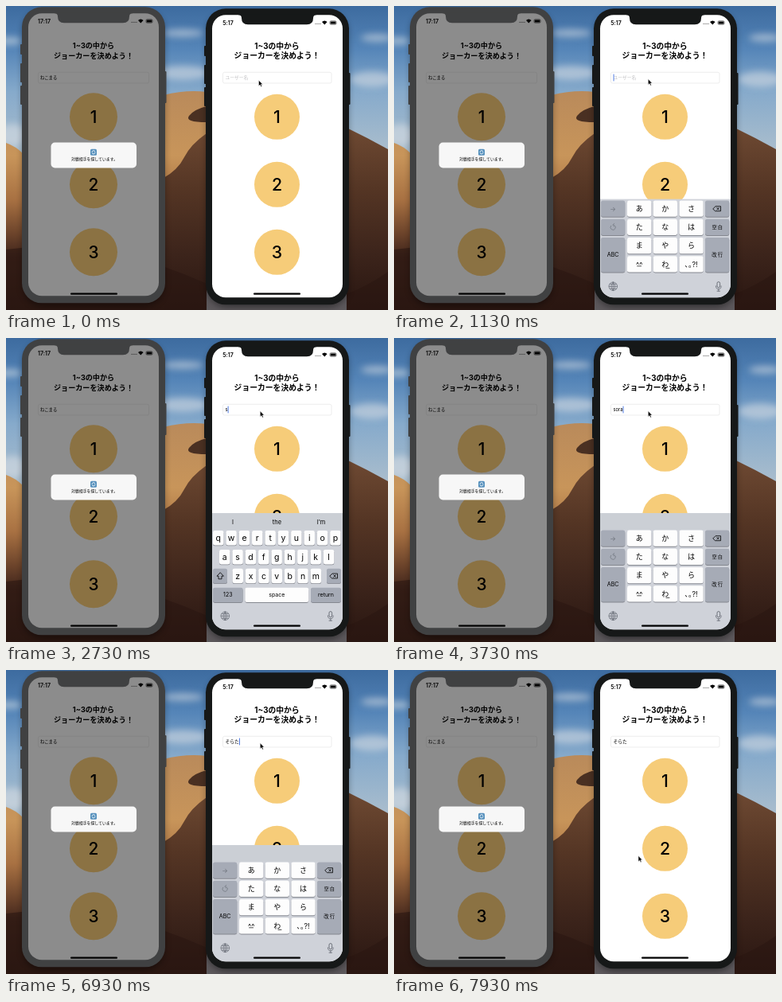
An HTML page that plays this animation: 480x382 px, repeating every 8 s.

```html
<!DOCTYPE html>
<html lang="ja">
<meta charset="utf-8">
<style>
html, body { margin: 0; width: 100%; height: 100%; overflow: hidden; background: #22130f }
svg { display: block; width: 480px; height: 382px }
text { font-family: Inter, "Noto Sans CJK JP", "Noto Sans CJK", sans-serif; white-space: pre }
</style>
<svg id="stage" viewBox="0 0 480 382"></svg>
<script>
const LOOP = 8000;
const stage = document.getElementById('stage');
const $ = id => document.getElementById(id);

const rect = (x, y, w, h, fill, r = 0, more = '') =>
  `<rect x="${x}" y="${y}" width="${w}" height="${h}" rx="${r}" fill="${fill}" ${more}/>`;
const circle = (x, y, r, fill, more = '') => `<circle cx="${x}" cy="${y}" r="${r}" fill="${fill}" ${more}/>`;
const path = (d, fill, more = '') => `<path d="${d}" fill="${fill}" ${more}/>`;
const line = (d, color = '#000', w = .8) =>
  path(d, 'none', `stroke="${color}" stroke-width="${w}" stroke-linecap="round" stroke-linejoin="round"`);
const text = (s, x, y, size, fill = '#000', weight = 400, anchor = 'middle', more = '') =>
  `<text x="${x}" y="${y}" font-size="${size}" fill="${fill}" font-weight="${weight}" text-anchor="${anchor}" ${more}>${s}</text>`;
const group = (body, more = '') => `<g ${more}>${body}</g>`;
const gradient = (id, y1, y2, ...stops) =>
  `<linearGradient id="${id}" gradientUnits="userSpaceOnUse" x1="0" x2="0" y1="${y1}" y2="${y2}">` +
  stops.map(([at, c]) => `<stop offset="${at}" stop-color="${c}"/>`).join('') + '</linearGradient>';

const defs = `<defs>
  ${gradient('sky', 0, 180, [0, '#3d6b9f'], [.3, '#5585b8'], [.6, '#86aacb'], [1, '#a9bdcd'])}
  ${gradient('sand', 105, 382, [0, '#b98a5b'], [.3, '#c8955a'], [.5, '#a87142'], [.66, '#6a422a'], [.76, '#3f251b'], [1, '#2a1711'])}
  ${gradient('shade', 150, 382, [0, '#6f4a33'], [.35, '#543524'], [.7, '#3c241b'], [1, '#291611'])}
  <filter id="soft" x="-50%" y="-50%" width="200%" height="200%"><feGaussianBlur stdDeviation="4"/></filter>
  <clipPath id="screen">${rect(259, 11.3, 164, 355, '#fff', 17)}</clipPath>
</defs>`;

const wallpaper =
  rect(0, 0, 480, 382, 'url(#sky)') +
  group([[4, 44, 16, 5], [8, 162, 18, 14], [222, 34, 26, 5], [222, 84, 34, 9], [466, 40, 20, 5], [460, 92, 28, 10]].map(([x, y, rx, ry]) =>
    `<ellipse cx="${x}" cy="${y}" rx="${rx}" ry="${ry}" fill="#dae1e6" opacity=".55"/>`).join(''), 'filter="url(#soft)"') +
  path('M0 172Q12 176 22 186L198 112Q226 105 252 108V382H0Z', 'url(#sand)') +
  path('M252 126Q236 130 230 138T252 146Z', '#4a3022') +
  path('M252 160Q232 174 224 190T198 216V382H252Z', 'url(#shade)') +
  path('M428 153Q455 166 480 180V382H428Z', 'url(#shade)') +
  path('M0 306Q120 290 250 348T480 334V382H0Z', '#2a1711', 'opacity=".6"');

// Body, side buttons, screen, notch and status bar of one phone.
function phone({ x, y, body, paper, clock }) {
  const ink = '#000', top = y + 8.3;
  const buttons = [[47, 13], [71, 24], [99, 24]].map(([dy, h]) => rect(x - 2, y + dy, 4, h, body, 1)).join('') +
    rect(x + 178, y + 81, 3.5, 40, body, 1);
  const notch = `M${x + 41} ${top - 1}H${x + 139}V${top}Q${x + 135} ${top} ${x + 135} ${top + 4}Q${x + 135} ${top + 12} ${x + 127} ${top + 12}` +
    `H${x + 53}Q${x + 45} ${top + 12} ${x + 45} ${top + 4}Q${x + 45} ${top} ${x + 41} ${top}Z`;
  const sy = y + 18;
  const status = text(clock, x + 28, sy + 2.5, 7, ink, 600) +
    [0, 2, 4, 6].map(d => circle(x + 138 + d, sy + 1.4, .6, ink, 'opacity=".6"')).join('') +
    path(`M${x + 146} ${sy - 1}Q${x + 149.3} ${sy - 4} ${x + 152.6} ${sy - 1}L${x + 149.3} ${sy + 2.6}Z`, ink) +
    rect(x + 156, sy - 2.2, 8, 4.4, 'none', 1.3, `stroke="${ink}" stroke-width=".5"`) +
    rect(x + 156.7, sy - 1.6, 6.6, 3.2, ink, .7);
  return rect(x + 1, y + 5, 178, 371, '#000', 26, 'opacity=".4" filter="url(#soft)"') +
    buttons + rect(x, y + .3, 180, 372, body, 25) +
    rect(x + 8, top, 164, 355, paper, 17) + path(notch, body) + status;
}

// Title, input box and the three numbered discs.
function page({ cx, titleY, size, disc, r, box, edge, num }) {
  return text('1~3の中から', cx, titleY, size, '#000', 700) +
    text('ジョーカーを決めよう！', cx, titleY + 12.4, size, '#000', 700) +
    rect(box[0], 83.3, box[1], 13.7, 'none', 2, `stroke="${edge}" stroke-width=".7"`) +
    [1, 2, 3].map(n => {
      const y = 54.3 + 85 * n;
      return circle(cx, y, r, disc) + text(n, cx, y + 7.6, num, '#000', 450);
    }).join('');
}

const home = x => rect(x, 360.6, 59, 2.1, '#000', 1);

const left = phone({ x: 20, y: 1, body: '#404142', paper: '#8c8c8c', clock: '17:17' }) +
  page({ cx: 110, titleY: 53.2, size: 9.1, disc: '#8b7243', r: 30, box: [40.5, 139], edge: '#828282', num: 20.8 }) +
  text('ねこまる', 43, 92.2, 5.3, '#000', 400, 'start') +
  home(81) + rect(56.5, 171.5, 107.5, 32, '#f7f7f7', 5) +
  rect(106, 179.8, 8, 8, '#5791bd', 1.6) +
  line('M108 183.4A2.1 2.1 0 0 1 111.8 182.6M112 184.2A2.1 2.1 0 0 1 108.2 185', '#fff', .9) +
  text('対戦相手を探しています。', 111, 193.6, 4.9);

// Keyboards
const GREY = '#a6abb6';
const key = (x, y, w, h, label = '', size = 9, fill = '#fdfdfd', ink = '#000') =>
  rect(x, y + .9, w, h, '#858890', 2.4) + rect(x, y, w, h, fill, 2.4) +
  text(label, x + w / 2, y + h / 2 + size * .36, size, ink);
const eraser = (x, y) =>
  line(`M${x - 5} ${y}L${x - 2} ${y - 3}H${x + 4.5}V${y + 3}H${x - 2}ZM${x - .2} ${y - 1.3}l2.6 2.6m0 -2.6l-2.6 2.6`);

const rows = [241.5, 264.7, 288, 311.3], cols = [260, 293, 325.7, 358.4, 391];
const kana = ['あかさ', 'たなは', 'まやら', ['^^', 'わ', '､｡?!']].map((row, j) =>
  [...row].map((c, i) => key(cols[i + 1], rows[j], 30.3, 20.3, c, 9)).join('')).join('') +
  line('M305.6 323.8h5M342 326.4h4', '#000', .7) +
  key(260, rows[0], 30.3, 20.3, '→', 8, GREY, '#6e737c') +
  key(260, rows[1], 30.3, 20.3, '', 8, GREY) +
  line('M272.6 273.2A3.2 3.2 0 1 0 276.6 272.2M276.8 270.4l-2 1.8l2 1.8', '#6e737c', .7) +
  key(260, rows[2], 30.3, 43.6, 'ABC', 7.2, GREY) +
  key(391, rows[0], 30.3, 20.3, '', 7, GREY) + eraser(406, 251.7) +
  key(391, rows[1], 30.3, 20.3, '空\u2009白', 6.2, GREY) +
  key(391, rows[2], 30.3, 43.6, '', 7, GREY) +
  text('', 406.2, 312.2, 6.4, '#000', 400, 'middle', 'id="enter"');

const letters = (s, x, y) => [...s].map((c, i) => key(x + i * 16.35, y, 13.5, 18.4, c, 10.5)).join('');
const latin = letters('qwertyuiop', 260, 242) + letters('asdfghjkl', 268, 266) + letters('zxcvbnm', 284.5, 289.8) +
  key(260, 289.8, 18, 18.4, '', 7, GREY) + line('M269 295l-4 4.2h2v3.6h4v-3.6h2z') +
  key(403, 289.8, 18, 18.4, '', 7, GREY) + eraser(412, 299) +
  key(260, 313.7, 37.6, 18.4, '123', 7, GREY) + key(300.3, 313.7, 80, 18.4, 'space', 7) +
  key(383, 313.7, 38, 18.4, 'return', 7, GREY) +
  text('I', 285, 234, 7.4) + text('the', 340.4, 234, 7.4) + text("I'm", 396, 234, 7.4);

const tools = line('M270 349.3a5.3 5.3 0 1 0 10.6 0a5.3 5.3 0 1 0 -10.6 0H280.6M275.3 344v10.6M275.3 344q-5 5.3 0 10.6q5 -5.3 0 -10.6M271.2 346.4h8.2M271.2 352.2h8.2', '#555a63', .6) +
  rect(406, 343.6, 3.6, 7.2, 'none', 1.8, 'stroke="#555a63" stroke-width=".8"') +
  line('M404.4 348.8q0 4 3.4 4t3.4 -4M407.8 352.8v2.4M406 355.2h3.6', '#555a63', .7);

const keyboard = rect(258, 239.6, 166, 150, '#cfd2d9') +
  group(rect(258, 220, 166, 21, '#cbcfd5') + text('', 266, 234, 7, '#000', 400, 'start', 'id="hints"'), 'id="bar"') +
  group(kana, 'id="kana"') + group(latin, 'id="latin"') + tools;

const right = phone({ x: 251, y: 3, body: '#161818', paper: '#fff', clock: '5:17' }) +
  page({ cx: 340.5, titleY: 53.8, size: 9.8, disc: '#f6cc79', r: 28.5, box: [272.5, 136.5], edge: '#e6e6e6', num: 21.3 }) +
  rect(275.5, 85.6, 0, 9, '#c9dcf5', 0, 'id="mark"') +
  text('', 275.5, 92.2, 5.8, '#000', 400, 'start', 'id="entry"') +
  rect(0, 85.6, .9, 8.8, '#3f6fe0', 0, 'id="caret"') +
  group(group(keyboard, 'id="keys"'), 'clip-path="url(#screen)"') + home(311);

const pointer = path('M0 0V7.2L1.7 5.7L2.9 8.3L4.1 7.8L3 5.2H5.1Z', '#000', 'id="mouse" stroke="#fff" stroke-width=".5"');

stage.innerHTML = defs + wallpaper + left + right + pointer;

// Time, field content, word suggestions, whether it is still being composed.
const typing = [
  [0, ''], [2730, 's'], [2930, 'so'], [3130, 'sor'], [3330, 'sora'],
  [4070, 'sor'], [4150, 'so'], [4230, 's'], [4330, ''],
  [5070, 's', '', 1], [5270, 'そ', 'そ　　其　　素', 1], [5470, 'そr', '', 1], [5670, 'そら', '空　　そら　　宙', 1],
  [6330, 'そらt', '', 1], [6530, 'そらた', '空た　　そらた　　宙た', 1], [6930, 'そらた']
];
const moves = [[0, 317.5, 93.3], [530, 319.3, 91.8], [7250, 319.3, 91.8], [7600, 308, 230], [7930, 307, 233.5], [8000, 307, 233.5]];

const clamp = v => Math.max(0, Math.min(1, v));
const smooth = v => v * v * (3 - 2 * v);
const show = (id, on) => $(id).style.display = on ? '' : 'none';

function draw(t) {
  const [, value, hints = '', composing] = typing.filter(s => s[0] <= t).pop();
  const entry = $('entry');
  entry.textContent = value || 'ユーザー名';
  entry.setAttribute('fill', value ? '#000' : '#c4c4c6');
  const width = value ? entry.getComputedTextLength() : 0;
  $('mark').setAttribute('width', composing ? width : 0);
  $('caret').setAttribute('x', 275.6 + width);
  show('caret', t >= 830 && t < 7130);

  const english = t >= 1930 && t < 3600;
  show('latin', english);
  show('kana', !english);
  show('bar', t >= 1200);
  $('hints').textContent = hints;
  $('enter').textContent = composing ? '確\u2009定' : '改\u2009行';

  const open = t < 800 ? 160 : t < 1500 ? 130 * Math.exp((800 - t) / 88) : 0;
  const drop = open + 160 * smooth(clamp((t - 7130) / 400));
  $('keys').setAttribute('transform', `translate(0 ${drop.toFixed(2)})`);

  const i = Math.max(0, moves.findIndex(m => m[0] > t) - 1);
  const [t0, x0, y0] = moves[i], [t1, x1, y1] = moves[i + 1];
  const k = smooth(clamp((t - t0) / (t1 - t0)));
  $('mouse').setAttribute('transform', `translate(${x0 + (x1 - x0) * k} ${y0 + (y1 - y0) * k})`);
}

const start = performance.now();
function tick() {
  draw((performance.now() - start) % LOOP);
  requestAnimationFrame(tick);
}
tick();
</script>
</html>
```
